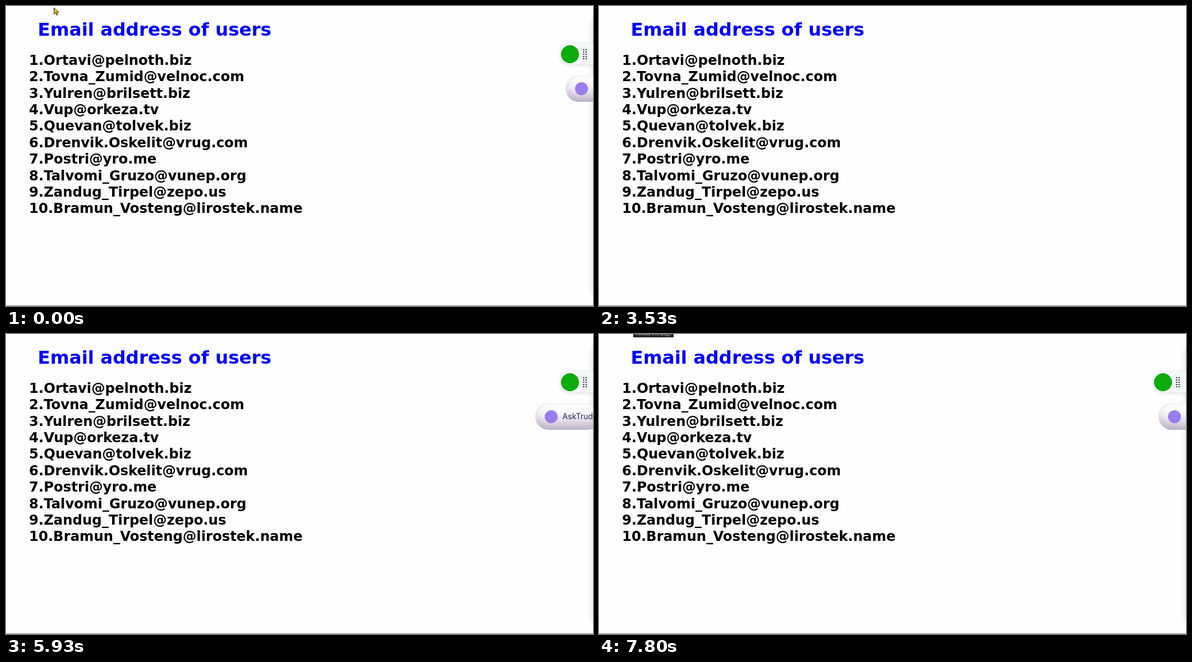
Write an HTML page that moves like this. It is 1046 px wide and 535 px high and loops after 8000 ms.

```html
<!DOCTYPE html>
<html lang="en">
<head>
<meta charset="utf-8">
<title>Email address of users</title>
<style>
  html, body { margin: 0; width: 100%; height: 100%; overflow: hidden; background: #fefefe; }
  #stage { position: relative; width: 1046px; height: 535px; overflow: hidden; }
  #stage * { position: absolute; }
  svg { left: 0; top: 0; }
  text { font: bold 24.35px "DejaVu Sans", sans-serif; }
  #title { font-size: 32.55px; fill: #00f; }
  #edge { left: 1048px; top: 26px; width: 40px; height: 488px; box-shadow: 0 0 12px rgba(0,0,0,.22); }
  #tab { left: 988px; top: 67px; width: 80px; height: 37px; border-radius: 19px 0 0 19px;
         background: #f3f7fa; box-shadow: 0 1px 6px rgba(0,0,0,.15); }
  #badge { left: 1px; top: 2.5px; width: 32px; height: 32px; border-radius: 50%; background: #0bac0b; }
  #grip { left: 39px; top: 9px; width: 9px; height: 20px;
          background: radial-gradient(circle, #3c4147 1px, transparent 1.5px) 0 0 / 4.5px 4px; }
  #pill { left: 0; top: 123px; width: 116px; height: 48px; border-radius: 24px;
          background: linear-gradient(#fefefe 10%, #f4f1f5 45%, #cdc2d3 95%);
          box-shadow: inset 4px -5px 12px rgba(175,165,185,.35), inset -6px -4px 12px rgba(190,170,200,.3),
                      inset 0 8px 8px #fefefe; }
  #icon { left: 17px; top: 13px; width: 23px; height: 23px; border-radius: 50%; background: #9b7cec; }
  #label { left: 49px; top: 15px; font: 14px/18px Inter, sans-serif; color: #2b2a5e; white-space: nowrap; }
  #tip { left: 61px; top: -12px; width: 72px; height: 18px; background: #25272a; color: #ddd;
         font: 8.3px/21px "Open Sans", sans-serif; text-align: center; }
  #rule { left: 0; top: 534px; width: 1046px; height: 1px; background: #767676; }
</style>
</head>
<body>
<div id="stage">
  <svg width="1046" height="535">
    <g id="page"><text id="title" x="56.6" y="53">Email address of users</text></g>
    <text id="loading" x="-.5" y="24.5">Loading...</text>
    <path id="cursor" d="M0 0V11.5L2.7 9 4.8 13.4 6.8 12.4 4.8 8.4H8.4Z" fill="#fdbb16" stroke="#222" stroke-linejoin="round"/>
  </svg>
  <div id="widget">
    <div id="edge"></div>
    <div id="tab"><div id="badge"></div><div id="grip"></div></div>
  </div>
  <div id="pill"><div id="icon"></div><div id="label">AskTrud</div></div>
  <div id="tip">Reload this page</div>
  <div id="rule"></div>
</div>
<script>
  const LOOP = 8000, FPS = 15;
  const el = id => document.getElementById(id);
  const show = (id, on) => { el(id).style.visibility = on ? 'visible' : 'hidden'; };

  const emails = [
    'Ortavi@pelnoth.biz', 'Tovna_Zumid@velnoc.com', 'Yulren@brilsett.biz', 'Vup@orkeza.tv',
    'Quevan@tolvek.biz', 'Drenvik.Oskelit@vrug.com', 'Postri@yro.me', 'Talvomi_Gruzo@vunep.org',
    'Zandug_Tirpel@zepo.us', 'Bramun_Vosteng@lirostek.name'
  ];
  emails.forEach((email, i) => {
    const row = document.createElementNS('http://www.w3.org/2000/svg', 'text');
    row.setAttribute('x', 41);
    row.setAttribute('y', 104.8 + i * 29.4);
    row.textContent = `${i + 1}.${email}`;
    el('page').append(row);
  });

  const bezier = (a, b, s) => 3 * a * s * (1 - s) ** 2 + 3 * b * s * s * (1 - s) + s ** 3;

  // The CSS "ease" curve, solved by bisection.
  function ease(u) {
    let lo = 0, hi = 1;
    for (let i = 0; i < 20; i++) {
      const mid = (lo + hi) / 2;
      if (bezier(.25, .25, mid) < u) lo = mid; else hi = mid;
    }
    return bezier(.1, 1, lo);
  }

  function draw(t) {
    const step = Math.floor((t + 5) * FPS / 1000);
    const slide = Math.min(1, Math.max(0, (step - 87) / 8));
    const loading = t >= 2600 && t < 3530;
    const firstView = t < 2600;

    show('page', !loading);
    show('loading', loading);
    show('widget', firstView || t >= 4930);
    show('pill', firstView || t >= 5800);
    show('label', t >= 5800 && slide < 1);
    show('icon', firstView || step > 87);
    show('tip', t >= 7800);

    el('pill').style.left = (firstView ? 997 : 905 + 92 * ease(slide)) + 'px';

    // The pointer dips a little, then leaves.
    const k = Math.max(0, step - 1);
    show('cursor', step < 7);
    el('cursor').setAttribute('transform', `translate(${85.5 + k * .4} ${3 + k * (5.2 - k) * 1.78})`);
  }

  function tick() {
    draw(performance.now() % LOOP);
    requestAnimationFrame(tick);
  }
  tick();
</script>
</body>
</html>
```
